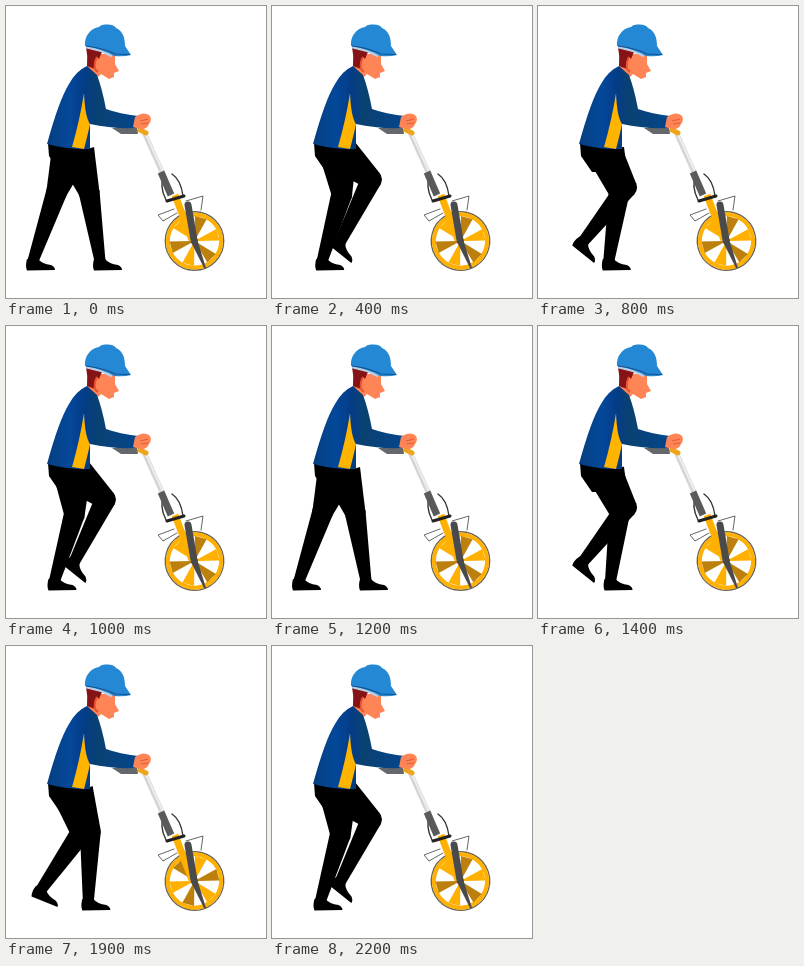
An HTML page that plays this animation: 260x292 px, repeating every 2.3 s.

```html
<!DOCTYPE html>
<html lang="en">
<head>
<meta charset="utf-8">
<style>
html, body { margin: 0; width: 100%; height: 100%; overflow: hidden; background: #fff; }
svg { display: block; width: 100vw; height: 100vh; }
</style>
</head>
<body>
<svg viewBox="0 0 260 292">
  <defs>
    <linearGradient id="cloth" x1="0" y1="0" x2="1" y2="0">
      <stop offset="0" stop-color="#063f80"/><stop offset=".25" stop-color="#04489a"/>
      <stop offset=".42" stop-color="#043c86"/><stop offset=".55" stop-color="#0a4172"/>
      <stop offset="1" stop-color="#04468c"/>
    </linearGradient>
  </defs>

  <g id="legs" fill="#000"></g>

  <!-- measuring wheel -->
  <g id="wheel">
    <circle r="29.2" fill="none" stroke="#6a6458" stroke-width="1.4"/>
    <circle r="26.6" fill="none" stroke="#ffb000" stroke-width="4"/>
    <g id="spokes"></g>
  </g>
  <g fill="none" stroke="#333" stroke-linecap="round" stroke-linejoin="round">
    <path d="M168 203L152 209L157 215L171 207M180 195L197 190L195 204" stroke-width=".9" stroke="#555"/>
    <path d="M158 169Q153 180 160 194M166 168Q175 174 177 190" stroke-width="1.4"/>
    <path d="M169 189L186 234" stroke="#ffb000" stroke-width="7" stroke-linecap="butt"/>
    <path d="M161 195L178 190" stroke-width="3" stroke="#222"/>
    <path d="M182 199L188 234" stroke="#4a4a4c" stroke-width="7"/>
    <path d="M138 126L156 166" stroke="#d4d4d6" stroke-width="5" stroke-linecap="butt"/>
    <path d="M139 126L157 166" stroke="#eeeef0" stroke-width="2" stroke-linecap="butt"/>
    <path d="M155 166L165 189" stroke="#5a5a5c" stroke-width="7" stroke-linecap="butt"/>
    <path d="M134 124L140 127" stroke="#efa51a" stroke-width="5"/>
  </g>
  <path d="M106 122L131 121L132 128L115 128Z" fill="#66676a"/>
  <path d="M185 236L191 233L200 262L198 262Z" fill="#4a4a4c"/>
  <circle cx="188.3" cy="235" r="3.4" fill="#4a4a4c"/>

  <!-- head -->
  <path d="M84 48L109 48L109 58L113 65L108 67L108 71L103 73L95 68L92 71L81 61Z" fill="#ff8456"/>
  <path d="M80 41L96 46L93 53L91 51Q87 56 89 63L81 60Q82 50 80 41Z" fill="#861416"/>
  <path d="M91 51Q88 56 89 63L92 66" fill="none" stroke="#e9512f" stroke-width="2"/>
  <path d="M80 41L96 45L106 50" fill="none" stroke="#b9cfe6" stroke-width="2.6"/>
  <path d="M79 40C78 30 85 22 93 21Q95 18 100 18.5Q108 18 110 22C117 25 119 32 119 40L125 49Q118 51 108 50Q96 43 79 40Z" fill="#2588d5"/>
  <path d="M80 40Q97 42 109 48L124 48.5" fill="none" stroke="#14508c" stroke-width="1.2"/>

  <!-- jacket, arm and hand -->
  <path d="M81 60Q70 65 63 78Q53 94 41 138Q62 144 84 143L84 118Q106 123 129 122L132 110Q114 108 100 103Q96 82 91 69Z" fill="url(#cloth)"/>
  <path d="M78 87Q74 113 66 141L78 143Q82 128 84 118Q79 111 78 87Z" fill="#ffb400"/>
  <path d="M129 111Q137 105 143 109Q147 113 143 118Q141 124 134 123L127 121Z" fill="#ff8456"/>
  <path d="M134 115L142 113M135 118L142 117" stroke="#e05a38" stroke-width="1"/>
</svg>
<script>
const LOOP = 2300, TICK = 100, STEP = 600;
const THIGH = 41, SHANK = 70, HIP_Y = 147;
const legs = document.getElementById('legs');
const wheel = document.getElementById('wheel');

const wedge = (angle, spread, inner, outer, color) => {
  const at = (r, a) => [r * Math.cos(a * Math.PI / 180), r * Math.sin(a * Math.PI / 180)].join(' ');
  return `<path fill="${color}" d="M${at(inner, angle - spread)}L${at(outer, angle - spread)}L${at(outer, angle + spread)}L${at(inner, angle + spread)}Z"/>`;
};

let spokes = '';
for (let i = 0; i < 6; i++) spokes += wedge(i * 60 - 75, 14, 3, 25, i % 2 ? '#ffb000' : '#bd800c');
document.getElementById('spokes').innerHTML = spokes;

// Tapered limb section with a round end at b
function limb(a, b, ra, rb) {
  const angle = Math.atan2(b[1] - a[1], b[0] - a[0]);
  const nx = -Math.sin(angle), ny = Math.cos(angle);
  const side = (p, r) => `${p[0] + nx * r} ${p[1] + ny * r}`;
  return `<path d="M${side(a, ra)}L${side(b, rb)}L${side(b, -rb)}L${side(a, -ra)}Z"/>` +
    `<circle cx="${b[0]}" cy="${b[1]}" r="${rb}"/>`;
}

function leg(hipX, x, y, tilt) {
  const hip = [hipX, HIP_Y], dx = x - hipX, dy = y - HIP_Y;
  const d = Math.min(Math.hypot(dx, dy), THIGH + SHANK);
  const along = (d * d + THIGH ** 2 - SHANK ** 2) / (2 * d);
  const out = Math.sqrt(Math.max(0, THIGH ** 2 - along ** 2));
  const dir = Math.atan2(dy, dx), c = Math.cos(dir), s = Math.sin(dir);
  const knee = [hipX + along * c + out * s, HIP_Y + along * s - out * c];
  return limb(hip, knee, 19, 10.5) + limb(knee, [x, y], 10.5, 5.5) +
    `<path transform="translate(${x} ${y}) rotate(${tilt})" d="M-6 -2L5 -2Q9 3 18 4Q22 6 22 9L-6 9.5Q-8 5 -6 -2Z"/>`;
}

function draw(time) {
  const t = Math.floor(time % LOOP / TICK) * TICK;
  const p = t % STEP / STEP, odd = Math.floor(t / STEP) % 2;
  const lift = Math.sin(Math.PI * p);
  const stance = leg(70 - 6 * p, 94 - 67 * p + (odd ? -1 : 1) * lift, 255, 0);
  const swing = leg(64 + 6 * p, 27 + 67 * p ** 1.2, 255 - 22 * lift, 46 * lift);
  legs.innerHTML = '<path d="M42 137L84 141L86 153L76 166L54 166L43 150Z"/>' + stance + swing;
  wheel.setAttribute('transform', `translate(188.5 235) rotate(${t / STEP * 360})`);
}

const start = performance.now();
function frame() {
  draw(performance.now() - start);
  requestAnimationFrame(frame);
}
frame();
</script>
</body>
</html>
```
